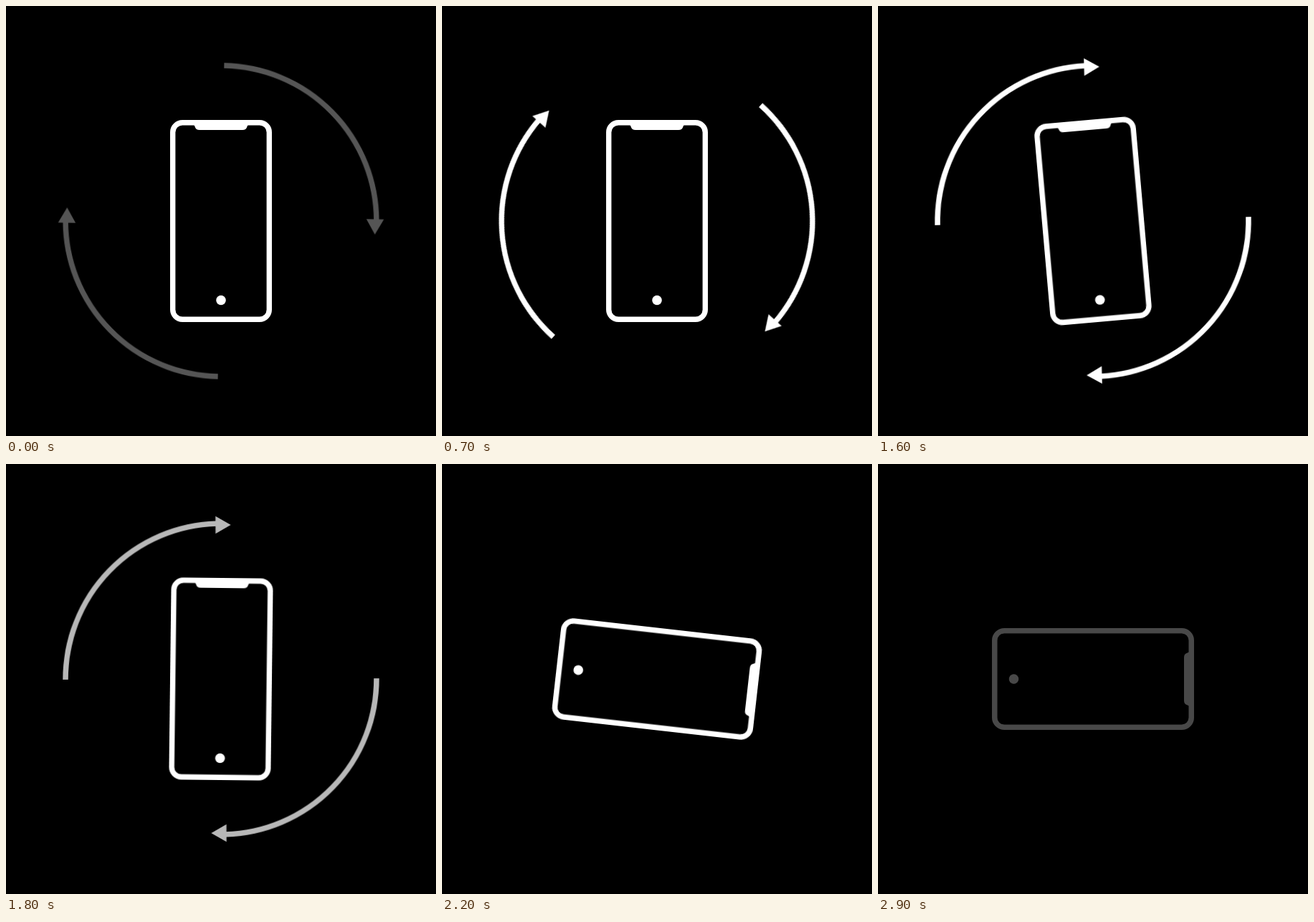
Animation, 600 px wide and 600 px high, one loop 3000 ms. Source, as an HTML page:

```html
<!DOCTYPE html>
<html lang="en">
<head>
<meta charset="utf-8">
<title>Rotate your device</title>
<style>
  html, body { margin: 0; width: 100%; height: 100%; overflow: hidden; background: #000; }
  svg { display: block; width: 100vw; height: 100vh; }
  .line { fill: none; stroke: #fff; stroke-width: 7.4; }
  .solid { fill: #fff; }
</style>
</head>
<body>
<svg viewBox="-300 -300 600 600">
  <defs>
    <g id="arrow">
      <path class="line" d="M0 -217A217 217 0 0 1 216.9 -5"/>
      <path class="solid" d="M202.8 -6.7H227.2L215 14.5Z"/>
    </g>
  </defs>
  <g id="arrows">
    <use href="#arrow"/>
    <use href="#arrow" transform="rotate(180)"/>
  </g>
  <g id="phone">
    <rect class="line" x="-67.3" y="-137.3" width="134.6" height="274.6" rx="13.5"/>
    <path class="solid" d="M-39 -134.5Q-36.7 -134 -36.4 -131.5Q-35 -127 -30 -127H30Q35 -127 36.4 -131.5Q36.7 -134 39 -134.5Z"/>
    <circle class="solid" cy="110.5" r="6.8"/>
  </g>
</svg>
<script>
  const LOOP = 3000, STEP = 100;
  const arrows = document.getElementById('arrows');
  const phone = document.getElementById('phone');
  const tracks = [];

  function track(el, frames, options) {
    const anim = el.animate(frames, { fill: 'both', ...options });
    anim.pause();
    tracks.push(anim);
  }

  function turn(el, start, end, easing) {
    track(el, { transform: ['rotate(0deg)', 'rotate(90deg)'] },
      { delay: start, duration: end - start, easing });
  }

  // Each stop is [time in ms, opacity].
  function fade(el, stops) {
    track(el, stops.map(([ms, opacity]) => ({ offset: ms / LOOP, opacity })),
      { duration: LOOP });
  }

  turn(arrows, -236, 1941, 'cubic-bezier(.603, 0, .24, 1)');
  turn(phone, 1500, 2400, 'cubic-bezier(.68, -.45, .36, 1.48)');
  fade(arrows, [[0, .335], [255, 1], [1690, 1], [2090, 0], [LOOP, 0]]);
  fade(phone, [[0, 1], [2620, 1], [LOOP, .03]]);

  // The picture advances ten times a second.
  function show(ms) {
    const time = Math.floor((ms % LOOP) / STEP) * STEP;
    for (const anim of tracks) anim.currentTime = time;
  }

  const start = performance.now();
  function tick() {
    show(performance.now() - start);
    requestAnimationFrame(tick);
  }
  tick();
</script>
</body>
</html>
```
